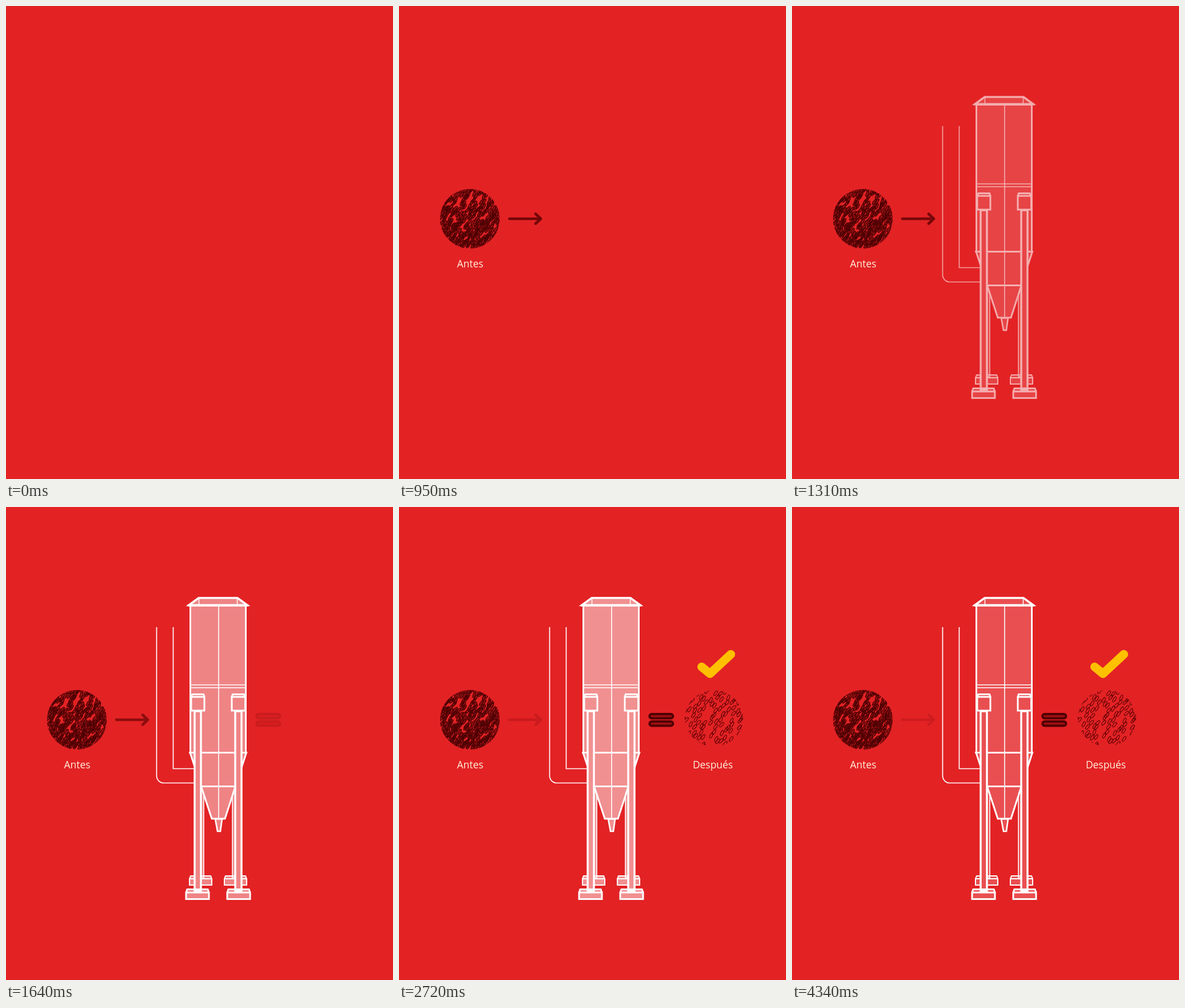
An HTML page for the animation above (4540 ms loop, 677x827 px).

```html
<!DOCTYPE html>
<html lang="es">
<head>
<meta charset="utf-8">
<title>Antes y después</title>
<style>
  html, body { margin: 0; width: 100%; height: 100%; overflow: hidden; background: #e32224; }
  svg { display: block; width: 677px; height: 827px; }
  text { font: 17.4px "Open Sans", "Noto Sans", sans-serif; fill: #fff1dc; text-anchor: middle; }
  .fade { opacity: 0; }
</style>
</head>
<body>
<svg viewBox="0 0 677 827">
  <defs>
    <clipPath id="clipBefore"><circle cx="124" cy="372" r="52"/></clipPath>
    <clipPath id="clipAfter"><ellipse cx="551" cy="369.5" rx="51" ry="49"/></clipPath>
    <!-- hides whatever stands behind the front legs -->
    <mask id="behind" maskUnits="userSpaceOnUse" x="0" y="0" width="677" height="827">
      <rect width="677" height="827" fill="#fff"/>
      <path d="M330 357h11v314h-11zM401 357h11v314h-11z"/>
    </mask>
    <g id="machine">
      <g mask="url(#behind)">
        <g stroke-width="1.6">
          <path d="M341 488L346 503V648H341zM401 488L396 503V648H401z"/>
        </g>
        <g stroke-width="2">
          <path d="M321 650h39v11h-39zL323 645h35l2 5M382 650h39v11h-39zL384 645h35l2 5"/>
        </g>
        <g stroke-width="3">
          <path d="M322.5 172H419.5V429.5H322.5z"/>
          <path d="M322 429.5H420.5L383 545H360z"/>
          <path d="M320 429.5H422M341 488.5H401"/>
          <path d="M366 545.5H378L375 567H370z" stroke-width="2.6"/>
        </g>
        <path d="M372 172V545M323 311H419M323 316H419" stroke-width="1.6"/>
      </g>
      <path d="M320 171.5L337 159H405L422 171.5z" stroke-width="3.6"/>
      <path d="M318 172H424" stroke-width="4"/>
      <path d="M337.5 160V171M404.5 160V171" stroke-width="1.5"/>
      <g stroke-width="3.4">
        <path d="M330 357h11v314h-11zM401 357h11v314h-11z"/>
      </g>
      <g stroke-width="3">
        <path d="M324 332h23v24h-23zL326 327.5h19.5l1.5 4.5"/>
        <path d="M395 332h23.5v24h-23.5zL396.5 327.5h19.5l2.5 4.5"/>
        <path d="M315 674h40v11.5h-40zL317 668.5h36l2 5.5"/>
        <path d="M387 674h40v11.5h-40zL389 668.5h36l2 5.5"/>
      </g>
    </g>
  </defs>

  <g id="before" class="fade">
    <g id="dense" clip-path="url(#clipBefore)" fill="#4a0003" fill-opacity=".5" stroke="#4a0003" stroke-width="1.3"></g>
    <text x="124.5" y="457">Antes</text>
  </g>

  <path id="arrow" class="fade" d="M193 372H247M239 363.5L248 372L239 380.5" fill="none"
    stroke="#580003" stroke-width="4.6" stroke-linecap="round" stroke-linejoin="round"/>

  <use id="fill" class="fade" href="#machine" fill="#fff" stroke="none"/>
  <g id="outline" class="fade" fill="none" stroke="#fff">
    <path d="M263.5 210V470a12.5 12.5 0 0 0 12.5 12.5H329M292.5 210V457.5H329" stroke-width="1.7"/>
    <use href="#machine"/>
  </g>

  <g id="equals" class="fade" fill="#a01012" stroke="#500003" stroke-width="4">
    <rect x="438.3" y="362" width="41" height="7.4" rx="3.7"/>
    <rect x="438.3" y="375" width="41" height="7.4" rx="3.7"/>
  </g>

  <g id="sparse" class="fade" clip-path="url(#clipAfter)" fill="none" stroke="#5c0305" stroke-width="1.1"></g>

  <g id="result" class="fade">
    <path d="M529.5 279.5L544 291.5L580.5 257.5" fill="none" stroke="#ffc000"
      stroke-width="15" stroke-linecap="round" stroke-linejoin="round"/>
    <text x="549" y="457">Después</text>
  </g>
</svg>
<script>
  const LOOP = 4540;
  const byId = id => document.getElementById(id);

  function randomFrom(seed) {
    return () => (seed = seed * 16807 % 2147483647) / 2147483647;
  }

  // Tilted grains on a loose grid; keep(x, y) gives the chance of a grain there.
  function scatter(id, cx, cy, pitch, rx, ry, seed, keep) {
    const rnd = randomFrom(seed);
    let out = "";
    for (let y = -54; y <= 54; y += pitch) {
      for (let x = -54; x <= 54; x += pitch) {
        const px = x + (rnd() - .5) * pitch * .8;
        const py = y + (rnd() - .5) * pitch * .8;
        const turn = -57 + (rnd() - .5) * 24;
        if (rnd() > keep(px, py)) continue;
        out += `<ellipse rx="${rx}" ry="${ry}" transform="translate(${(cx + px).toFixed(1)} ${(cy + py).toFixed(1)}) rotate(${turn.toFixed(0)})"/>`;
      }
    }
    byId(id).innerHTML = out;
  }

  scatter("dense", 124, 372, 5.7, 5.2, 2, 4127,
    (x, y) => .86 + y / 180 - .25 * Math.max(0, Math.sin(x / 9 + y / 6)));
  scatter("sparse", 551, 370, 9.6, 5, 2.1, 911,
    (x, y) => Math.hypot(x + 12, y - 18) < 9 ? .1 : .84);

  // Opacity over time: pairs of [ms, opacity].
  const tracks = {
    before: [[0, 0], [420, 1]],
    arrow: [[620, 0], [1030, 1], [1130, .86], [1640, .62], [2270, .34], [2720, .18], [4340, .15]],
    outline: [[1020, 0], [1520, 1]],
    fill: [[1130, 0], [1640, .45], [1740, .5], [2270, .26], [2800, .51], [3400, .22], [3860, .51], [4340, .21]],
    equals: [[1570, 0], [2000, 1]],
    sparse: [[1800, 0], [2240, 1]],
    result: [[2240, 0], [2690, 1]]
  };

  for (const [id, steps] of Object.entries(tracks)) {
    const last = steps[steps.length - 1][1];
    const all = [[0, 0], ...steps, [LOOP, last]];
    const frames = all.map(([ms, opacity]) => ({
      offset: ms / LOOP,
      opacity,
      easing: id === "fill" && ms >= 1740 ? "ease-in-out" : "linear"
    }));
    const motion = byId(id).animate(frames, { duration: LOOP, iterations: Infinity });
    motion.startTime = document.timeline.currentTime;
  }
</script>
</body>
</html>
```
